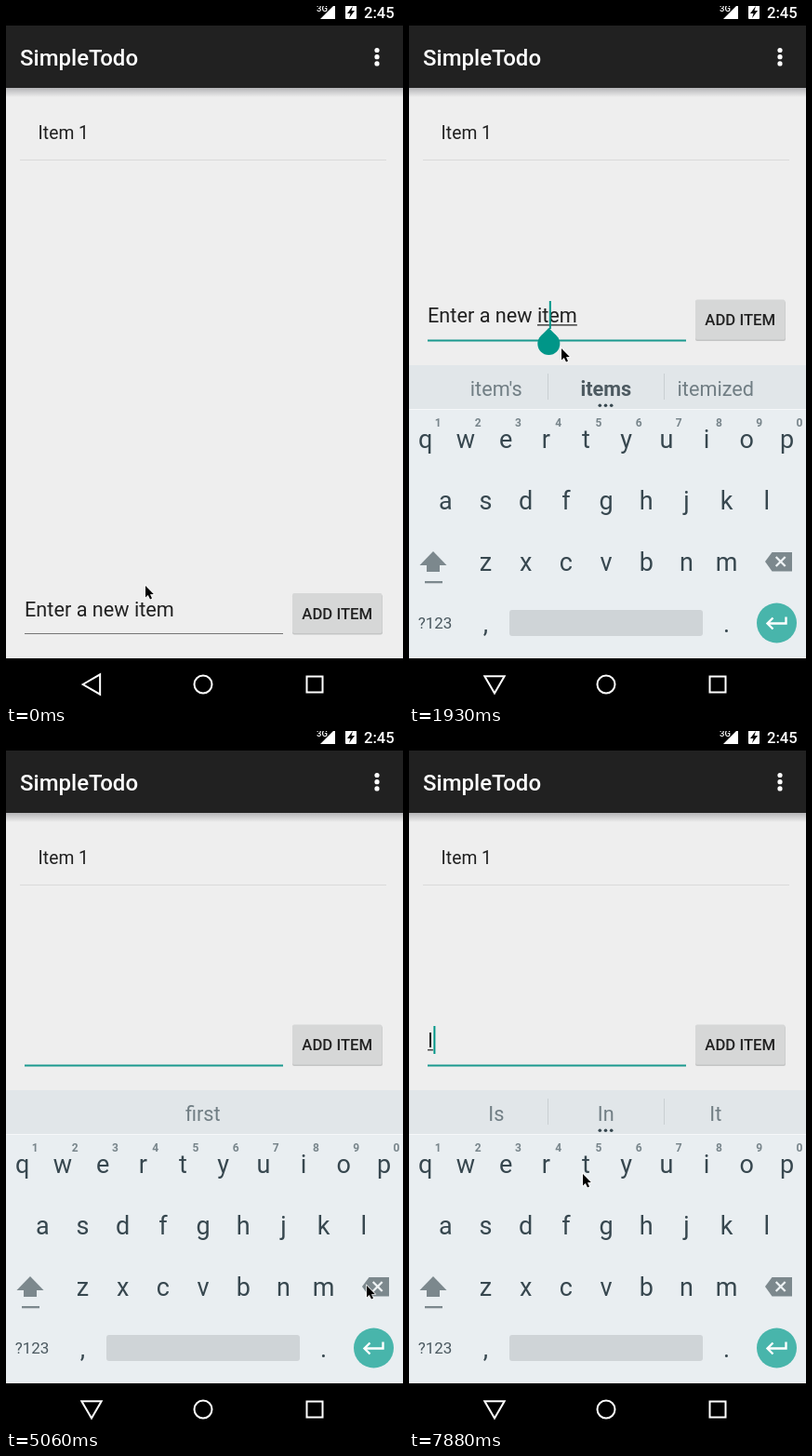
Write an HTML page with a canvas that moves like this. It is 427x749 px and loops after 8000 ms.

```html
<!DOCTYPE html>
<html lang="en">
<head>
<meta charset="utf-8">
<title>SimpleTodo</title>
<style>
html, body { margin: 0; width: 100%; height: 100%; overflow: hidden; background: #eee; }
canvas { display: block; width: 427px; height: 749px; }
</style>
</head>
<body>
<canvas id="stage" width="427" height="749"></canvas>
<script>
const c = document.getElementById('stage').getContext('2d');
const LOOP = 8000, STEP = 148.6, BLINK = 500;
const TEAL = '#009688', LIGHT_TEAL = '#48b5ab', KEY = '#37474f', ICON = '#7c888d', INK = '#212121';
const PHRASE = 'Enter a new item', TEXT_X = 20, TEXT_SIZE = 21.7;
const PITCH = 43.2;

// Steps at which things happen
const FOCUS = 3, OPEN = 4, DRAG = 10, DROP = 14, PRESS = 19, ERASE = 22, EMPTY = 28, SHIFT = 45, TYPE = 50;

// Pointer stops; it rests at each one and moves evenly between them
const STOPS = [
  { from: 0, to: 0, x: 150, y: 623 },
  { from: 1, to: 5, x: 104, y: 639 },
  { from: DRAG, to: DRAG, x: 105, y: 368 },
  { from: DROP, to: DROP, x: 183, y: 368 },
  { from: 18, to: 37, x: 388, y: 596 },
  { from: 40, to: 40, x: 298, y: 484 },
  { from: 43, to: SHIFT, x: 26, y: 594 },
  { from: 46, to: 46, x: 227, y: 500 },
  { from: 49, to: TYPE, x: 320, y: 470 },
  { from: 52, to: 53, x: 187, y: 476 }
];
// A star marks the bold hint
const HINTS = {
  new: ['news', '*new', 'newly'], item: ["item's", '*items', 'itemized'],
  ite: ["item's", '*item', 'items'], n: ['not', '*new', 'no'],
  a: ['an', '*a', 'and'], Ente: ['Entered', '*Enter', 'Entire'],
  E: ['Entered', 'Entire', 'Went'], I: ['Is', 'In', 'It'], '': ['one', 'item', 'car']
};

const clamp = v => Math.min(1, Math.max(0, v));
const mix = (a, b, f) => a + (b - a) * f;
const font = (size, weight = 400) => { c.font = `${weight} ${size}px Roboto, sans-serif`; };

function text(s, x, y, size, color, weight, align = 'left') {
  font(size, weight);
  c.textAlign = align;
  c.fillStyle = color;
  c.fillText(s, x, y);
}
function rect(x, y, w, h, color, r = 0) {
  c.fillStyle = color;
  c.beginPath();
  c.roundRect(x, y, w, h, r);
  c.fill();
}
function disc(x, y, r, color) {
  c.fillStyle = color;
  c.beginPath();
  c.arc(x, y, r, 0, 7);
  c.fill();
}
function trace(points, closed) {
  c.beginPath();
  points.forEach(p => c.lineTo(...p));
  if (closed) c.closePath();
}
function poly(points, color) {
  trace(points, true);
  c.fillStyle = color;
  c.fill();
}
function line(points, color, width, closed) {
  trace(points, closed);
  c.strokeStyle = color;
  c.lineWidth = width;
  c.stroke();
}
// Corners of a regular polygon whose first corner points along the given angle
const ngon = (n, x, y, r, angle) => Array.from({ length: n }, (_, i) => {
  const a = angle + i * 2 * Math.PI / n;
  return [x + r * Math.cos(a), y + r * Math.sin(a)];
});
function textWidth(s) {
  font(TEXT_SIZE);
  return c.measureText(s).width;
}

function pointerAt(k) {
  const i = STOPS.findIndex(p => p.to >= k);
  const b = STOPS[i], a = STOPS[i - 1] || b;
  const f = k >= b.from ? 1 : (k - a.to) / (b.from - a.to);
  return [mix(a.x, b.x, f), mix(a.y, b.y, f)].map(Math.round);
}

// The caret starts a fresh blink after focus, drop and every edit
function caretShown(k) {
  const reset = k < DROP ? FOCUS : k < ERASE ? DROP + .5 : k < TYPE ? Math.min(k, EMPTY - .6) : TYPE;
  return Math.floor((k - reset) * STEP / BLINK) % 2 === 0;
}

function valueAt(k) {
  if (k < ERASE) return PHRASE;
  if (k < EMPTY) return PHRASE.slice(0, Math.round(15 - (k - ERASE) * 2.8));
  return k < TYPE ? '' : 'I';
}

function stateAt(k) {
  const value = valueAt(k);
  const caret = k < ERASE ? Math.round(mix(9, 16, clamp((k - DRAG) / (DROP - DRAG)))) : value.length;
  const from = value.lastIndexOf(' ', caret - 1) + 1;
  const word = value.slice(from).split(' ')[0];
  const upper = k >= SHIFT && k < TYPE;
  return {
    value, caret, from, word, upper,
    focus: k >= FOCUS, open: k >= OPEN, slide: k === OPEN ? 130 : 0,
    handle: k < ERASE, erase: k >= PRESS && k < EMPTY, caretOn: caretShown(k),
    hints: k >= EMPTY && k < TYPE ? [upper ? 'First' : 'first'] : HINTS[word] || []
  };
}

function drawChrome() {
  rect(0, 0, 427, 749, '#eee');
  const shadow = c.createLinearGradient(0, 88, 0, 98);
  shadow.addColorStop(0, '#b4b4b7');
  shadow.addColorStop(1, '#eee');
  rect(0, 88, 427, 10, shadow);
  rect(0, 0, 427, 21, '#000');
  rect(0, 21, 427, 67, INK);

  poly([[338, 14], [354, 14], [354, -2]], '#fff');
  text('3G', 334, 5.5, 9.5, '#fff', 500);
  rect(365, -2, 12, 16, '#fff', 1);
  poly([[373, 0], [367, 8], [370.5, 8], [369, 13], [375, 5], [371.5, 5]], '#000');
  text('2:45', 385, 13, 16.6, '#fff', 500);

  text('SimpleTodo', 15, 63.5, 24, '#fff', 500);
  for (let i = -1; i < 2; i++) disc(399, 54.7 + i * 7.2, 2.6, '#fff');
  text('Item 1', 34.6, 143, 19.3, INK);
  rect(15, 165, 394, 1, '#dadada');
}

function drawEntry(s) {
  c.save();
  if (!s.open) c.translate(0, 315.5);
  rect(308, 317, 97, 43, '#c4c5c5', 2);
  rect(308, 315.5, 96.5, 43, '#d6d7d7', 2);
  text('ADD ITEM', 356.2, 343, 16.7, INK, 500, 'center');
  if (s.focus) rect(20, 358.5, 278, 2, '#1b9a8f');
  else rect(20, 358.5, 278, 1, '#757575');
  text(s.value, TEXT_X, 340, TEXT_SIZE, INK);
  if (s.focus) {
    const x = TEXT_X + textWidth(s.value.slice(0, s.caret));
    if (s.open)
      rect(TEXT_X + textWidth(s.value.slice(0, s.from)), 342.2, textWidth(s.word), 1.2, INK);
    if (s.caretOn) rect(x + .5, 317, 2, 30, TEAL);
    if (s.handle) {
      disc(x, 363, 12, TEAL);
      poly(ngon(4, x, 363, 17, -Math.PI / 2).map(([px, py]) => [mix(x, px, py > 362 ? .5 : 1), Math.min(py, 363)]), TEAL);
      poly([[x, 346], [x + 8.5, 354.5], [x - 8.5, 354.5]], TEAL);
    }
  }
  c.restore();
}

function drawHints(hints) {
  rect(0, 386, 427, 47, '#e1e6e9');
  rect(0, 433, 427, 1, '#f6f8f9');
  const spread = hints.length === 1 ? 0 : 118;
  hints.forEach((h, i) => {
    const bold = h[0] === '*';
    text(h.replace('*', ''), 211.8 + (i - 1) * spread, 418.7, TEXT_SIZE,
      bold ? '#4d5a61' : '#717e84', bold ? 700 : 400, 'center');
  });
  if (!spread) return;
  for (const x of [149, 274]) rect(x, 395, 1, 28, '#c9cfd2');
  for (let i = -1; i < 2; i++) disc(211.5 + i * 6.2, 429.3, 1.8, KEY);
}

function drawKeys(upper) {
  const indent = [0, .5, 1.5];
  ['qwertyuiop', 'asdfghjkl', 'zxcvbnm'].forEach((row, r) => [...row].forEach((ch, i) => {
    const x = 17.7 + (i + indent[r]) * PITCH;
    text(upper ? ch.toUpperCase() : ch, x, Math.round(475.3 + r * 65.7), 27, KEY, 400, 'center');
    if (!r) text((i + 1) % 10, x + 13.4, 451.7, 12, '#78858b', 700, 'center');
  }));
}

function drawKeyboard(s) {
  c.save();
  c.translate(0, s.slide);
  rect(0, 386, 427, 314 + 1, '#e9eef1');
  drawHints(s.hints);
  drawKeys(s.upper);

  const shift = s.upper ? LIGHT_TEAL : ICON;
  poly([[26, 586], [40.5, 601], [11.5, 601]], shift);
  rect(19, 600, 14, 8, shift);
  rect(17, 618, 19, 2.3, ICON);

  if (s.erase) rect(371, 572, 53, 50, '#cdd2d5');
  poly([[383, 597], [390.5, 587], [412, 587], [412, 607.5], [390.5, 607.5]], ICON);
  for (const d of [-5, 5]) line([[399.7 - d, 592], [399.7 + d, 602]], '#eef2f4', 2.3);

  text('?123', 28, 669, 17, '#4a585f', 400, 'center');
  text(',', 82.3, 672.5, 27, KEY, 400, 'center');
  text('.', 341.5, 673, 27, KEY, 400, 'center');
  rect(108, 649, 208, 28, '#cfd4d7', 3);
  disc(395.5, 663, 21.5, LIGHT_TEAL);
  line([[405.5, 656.5], [405.5, 663.5], [386, 663.5]], '#fff', 2.4);
  line([[391.5, 657.5], [385.5, 663.5], [391.5, 669.5]], '#fff', 2.4);
  c.restore();
}

function drawNav(open) {
  rect(0, 701, 427, 48, '#000');
  const back = open ? ngon(3, 92, 726.3, 12.3, Math.PI / 2) : ngon(3, 95, 729, 12.3, Math.PI);
  line(back, '#fff', 2, true);
  c.beginPath();
  c.arc(212, 729, 9.5, 0, 7);
  c.stroke();
  c.strokeRect(323.5, 720.5, 17, 17);
}

function drawPointer(x, y) {
  const arrow = [[0, 0], [0, 12.5], [2.8, 10], [5, 14.5], [7, 13.6], [5, 9.2], [8.8, 9]]
    .map(p => [p[0] + x, p[1] + y]);
  line(arrow, '#fff', 1.4, true);
  poly(arrow, '#000');
}

function draw(now) {
  const k = Math.min(53, Math.floor((now % LOOP + 5) / STEP));
  const s = stateAt(k);
  drawChrome();
  drawEntry(s);
  if (s.open) drawKeyboard(s);
  drawNav(s.open);
  drawPointer(...pointerAt(k));
}

let start;
function tick(now) {
  start ??= now;
  draw(now - start);
  requestAnimationFrame(tick);
}
requestAnimationFrame(tick);
</script>
</body>
</html>
```
